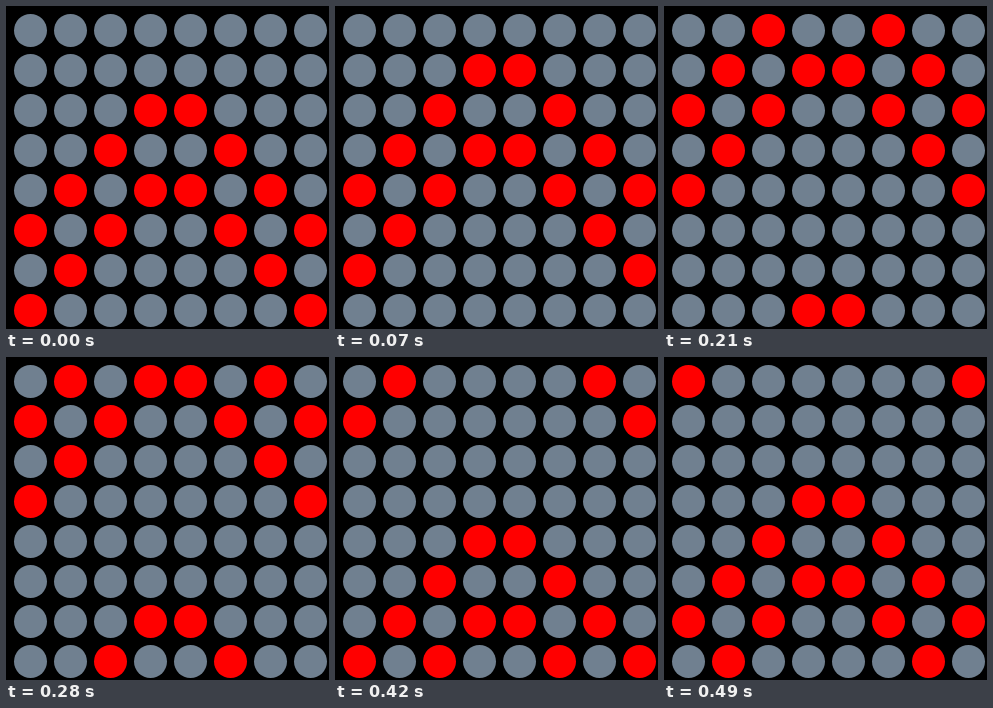
An HTML page with a canvas for the animation above (0.56 s loop, 323 by 323 pixels).

```html
<!DOCTYPE html>
<html lang="en">
<head>
<meta charset="utf-8">
<title>LED matrix arrows</title>
<style>
  html, body { margin: 0; width: 100%; height: 100%; overflow: hidden; background: #000; }
  canvas { display: block; }
</style>
</head>
<body>
<canvas id="matrix" width="323" height="323"></canvas>
<script>
const ctx = document.getElementById("matrix").getContext("2d");
const SIZE = 8, PITCH = 40, FIRST = 24.5, RADIUS = 16.5, STEP_MS = 70;
const PATTERN = [
  "........",
  "........",
  "...##...",
  "..#..#..",
  ".#.##.#.",
  "#.#..#.#",
  ".#....#.",
  "#......#",
];

function draw(shift) {
  ctx.fillStyle = "#000";
  ctx.fillRect(0, 0, 323, 323);
  for (let row = 0; row < SIZE; row++) {
    const line = PATTERN[(row + shift) % SIZE];
    for (let col = 0; col < SIZE; col++) {
      ctx.fillStyle = line[col] === "#" ? "#f00" : "#708090";
      ctx.beginPath();
      ctx.arc(FIRST + col * PITCH, FIRST + row * PITCH, RADIUS, 0, 2 * Math.PI);
      ctx.fill();
    }
  }
}

// The pattern scrolls up one whole row per step.
const start = performance.now();
function tick() {
  draw(Math.floor((performance.now() - start) / STEP_MS) % SIZE);
  requestAnimationFrame(tick);
}
tick();
</script>
</body>
</html>
```
